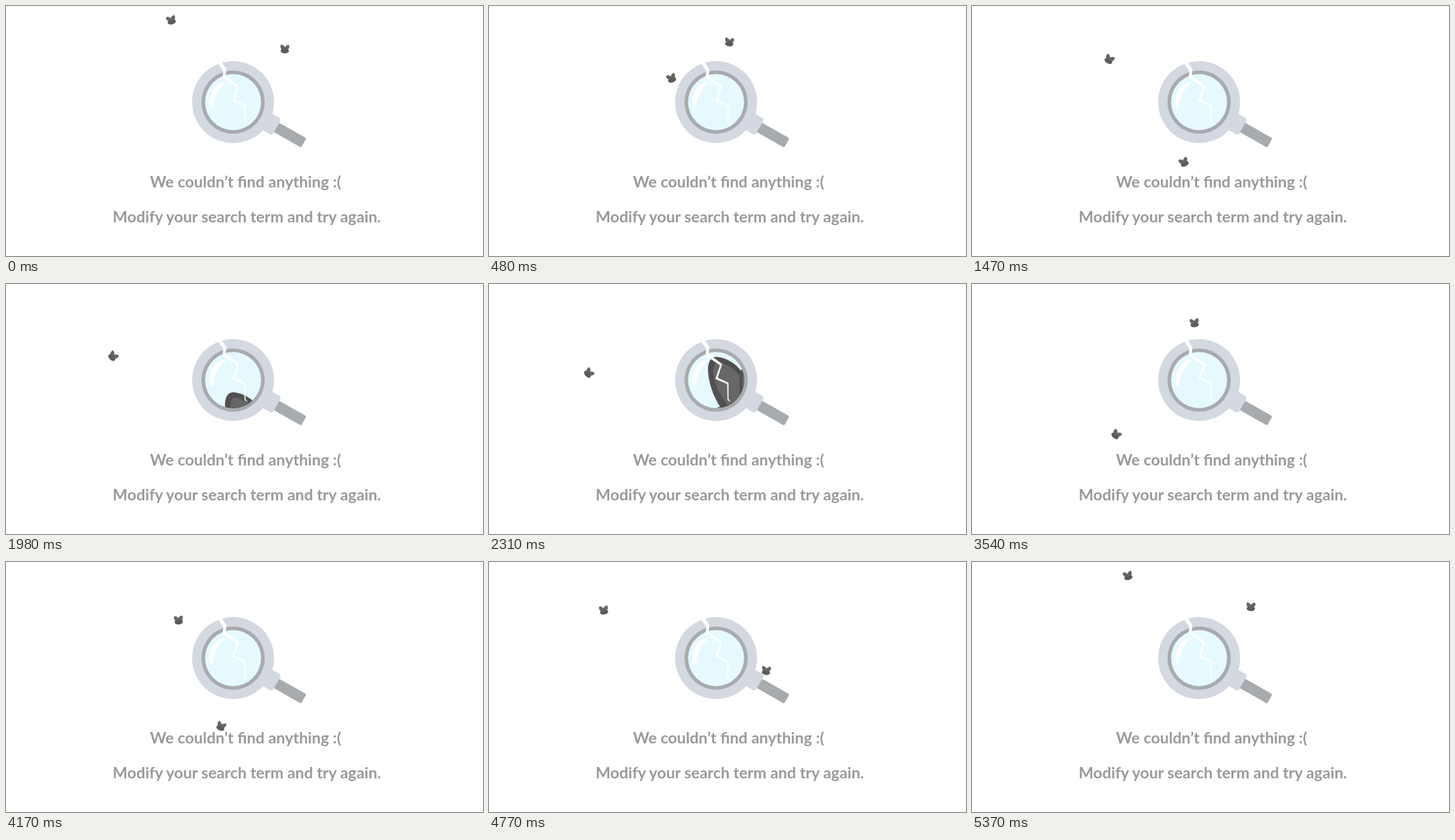
An HTML page for the animation above (5.4 s loop, 710x372 px).

```html
<!DOCTYPE html>
<html lang="en">
<head>
<meta charset="utf-8">
<title>Nothing found</title>
<style>
html, body { margin: 0; width: 100%; height: 100%; overflow: hidden; background: #fff; }
svg { display: block; width: 710px; height: 372px; }
text { font: 700 23.35px Lato, "Open Sans", sans-serif; fill: #999; text-anchor: middle; }
</style>
</head>
<body>
<svg viewBox="0 0 710 372">
  <defs>
    <clipPath id="glass"><circle cx="338" cy="143" r="42"/></clipPath>
    <path id="wing" fill="#666" stroke="#555" stroke-width=".6"
      d="M0 2C-3 2.500-5.500 0-6-2C-6.700-4.500-6.300-6.200-4.800-6C-2.500-5.500-.6-3.800 0-2Z"/>
    <g id="fly">
      <ellipse cy="2.8" rx="6.2" ry="3.7" fill="#5c5c5c"/>
      <use href="#wing"/><use href="#wing" transform="scale(-1 1)"/>
    </g>
    <g id="half">
      <path fill="#676767" d="M.5 6C-36 8-43 16-42 30C-42 52-30 68 .5 68Z"/>
      <path fill="#505050" d="M.5 20L-28 16C-44-4-52-38-48-52Q-45-63-35-62C-20-60-8-52 .5-41Z"/>
      <path fill="#676767" d="M-2 14L-18 12C-34-6-42-30-41-44Q-40-55-32-54C-18-50-8-42-2-34Z"/>
    </g>
  </defs>

  <text x="356.5" y="270">We couldn’t find anything :(</text>
  <text x="358.5" y="322">Modify your search term and try again.</text>

  <use id="a" href="#fly"/>
  <use id="b" href="#fly"/>

  <g transform="translate(338 143) rotate(29.5)">
    <rect x="66" y="-7" width="55.5" height="16" rx="2" fill="#a8abae"/>
    <rect x="48" y="-13.5" width="27" height="28" rx="4" fill="#d4d8e0"/>
  </g>
  <circle cx="338" cy="143" r="61" fill="#d4d8e0"/>
  <circle cx="338" cy="143" r="47" fill="#a8abae"/>
  <circle cx="338" cy="143" r="41.7" fill="#e6f9ff"/>
  <g clip-path="url(#glass)">
    <g id="zoom"><use href="#half"/><use href="#half" transform="scale(-1 1)"/></g>
  </g>
  <g fill="#fff">
    <path d="M327 113C313 112 300 130 303.500 150Q306 154 308 150C310 135 316 123 327 113Z"/>
    <path d="M314 83L321 83L328 94L327 104L347 119L340.500 139.500L356.500 147L356.500 171L360 176L355 172.500L354.500 148.800L337 141.300L343.800 121L322.500 106.500L323.500 97Z"/>
  </g>
</svg>
<script>
const LOOP = 5400, STEP = 600, TAU = 2 * Math.PI;

// One waypoint every STEP ms
const pathA = [[246, 21], [277, 131], [287, 238], [352, 202], [364, 150],
  [374, 108], [325, 56], [253, 87], [170, 70], [234, 19]];
const pathB = [[415, 64], [340, 53], [240, 69], [171, 96], [148, 140],
  [170, 199], [222, 226], [325, 243], [415, 157], [415, 64]];

// Catmull-Rom curve through the waypoints
function along(path, t) {
  const i = Math.floor(t / STEP), u = t / STEP - i;
  const [p, q, r, s] = [-1, 0, 1, 2].map(
    k => path[Math.min(Math.max(i + k, 0), path.length - 1)]);
  return [0, 1].map(c => q[c] + u / 2 * (r[c] - p[c]
    + u * (2 * p[c] - 5 * q[c] + 4 * r[c] - s[c]
    + u * (3 * (q[c] - r[c]) + s[c] - p[c]))));
}

function place(id, [x, y], tilt = 0) {
  document.getElementById(id)
    .setAttribute("transform", `translate(${x} ${y}) rotate(${tilt})`);
}

function draw() {
  const t = Math.floor(performance.now() % LOOP / 30) * 30;
  const turn = TAU * t / LOOP;
  place("a", along(pathA, t), -15 - 10 * Math.sin(turn));
  place("b", along(pathB, t), 26 - 24 * Math.cos(turn));
  // The magnified fly rises steadily past the glass
  place("zoom", [375, 540 - 0.16 * t]);
  requestAnimationFrame(draw);
}
draw();
</script>
</body>
</html>
```
